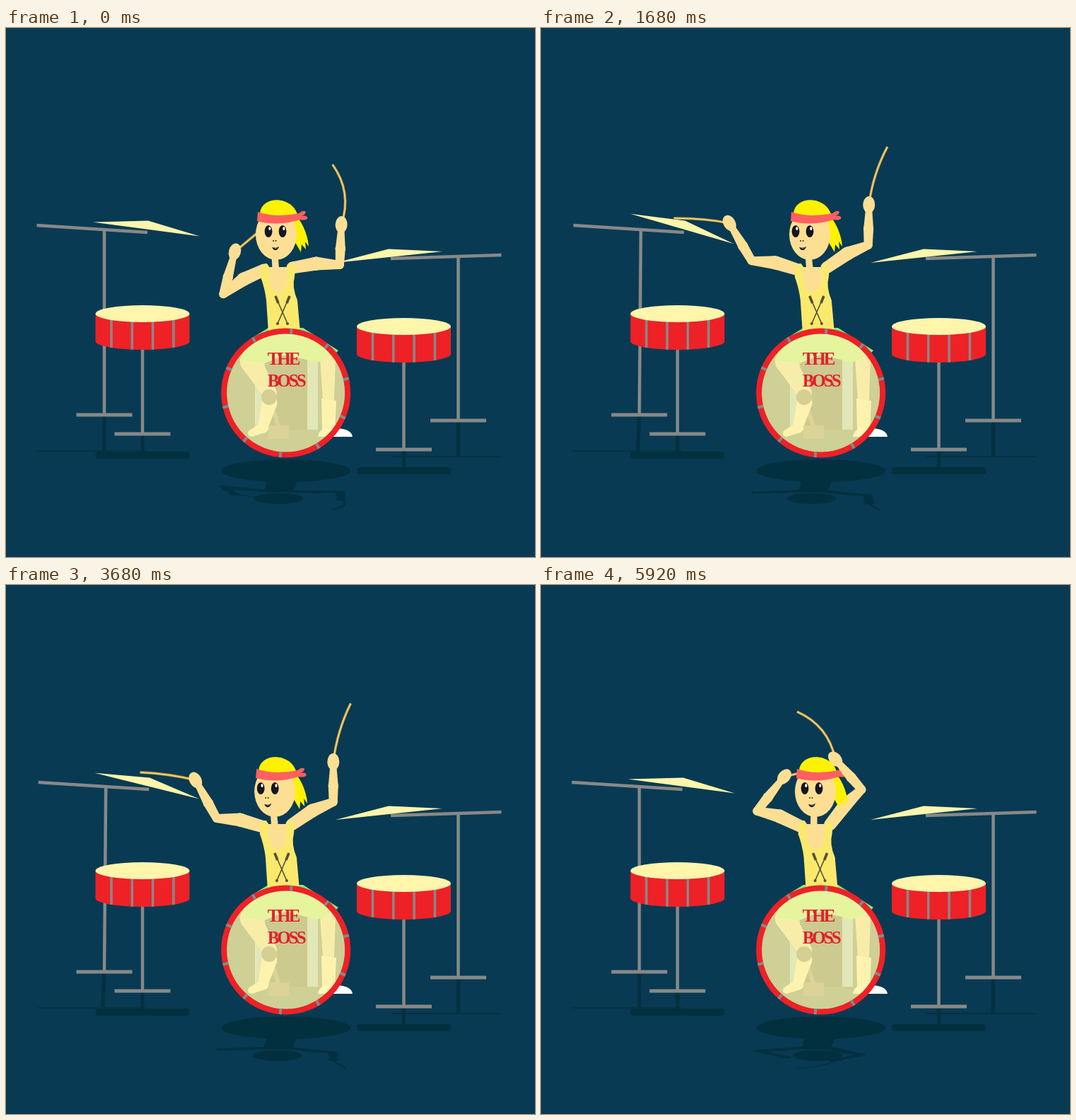
An HTML page with a canvas for the animation above (5.96 s loop, 748x748 px).

```html
<!DOCTYPE html>
<html lang="en">
<head>
<meta charset="utf-8">
<title>Drummer</title>
<style>
html, body { margin: 0; height: 100%; overflow: hidden; background: #083a53; }
canvas { display: block; width: 100vw; height: 100vh; }
</style>
</head>
<body>
<canvas id="stage" width="748" height="748"></canvas>
<script>
const c = document.getElementById('stage').getContext('2d');
const LOOP = 5960, BEAT = LOOP / 6, RAD = Math.PI / 180;
const BG = '#083a53', SHADE = '#03303f', GREY = '#888', RED = '#ee2127', CREAM = '#fff5ab',
      SKIN = '#fddf94', SHIRT = '#fbe96c', HAIR = '#fff200', BAND = '#ff6060', BLACK = '#15151c',
      LEG = '#dccfb4', BOOT = '#f4ecd8';

// Per hand: x, y, stick angle, stick bend. Then body lean and head turn.
const reach   = [344, 271,  -13, 0,  416, 246, -129, 22,  6, -.5],
      swing   = [324, 316,  -39, 0,  474, 278,  -99, 22,  0, -.1],
      strike  = [259, 345, -212, 3,  485, 287,   -2, -10, 12, 1],
      rebound = [263, 325, -211, 10, 475, 266,   -5, -14, 14, 1.2],
      raise   = [314, 258,  -62, 8,  444, 228,  -98, -6,  6, .1],
      crash   = [266, 276, -176, 4,  464, 250,  -72, -8, -2, -1];
const beat = [[0, swing], [160, strike], [194, strike], [212, rebound], [230, rebound],
  [440, raise], [640, crash], [675, crash], [BEAT - 40, reach]];
const keys = [-1, 0, 1].flatMap(n => beat.map(([t, p]) => [t + n * BEAT, p]));

const clamp = v => Math.min(1, Math.max(0, v));
// Swells up to a blow, holds briefly, then dies away
const blow = (t, at) => t < at ? clamp(1 - (at - t) / 100) : Math.exp(-Math.max(0, t - at - 34) / 45);

// Monotone cubic through the keys: smooth passes, no overshoot
function poseAt(t) {
  const i = keys.findIndex((k, j) => t >= k[0] && t < keys[j + 1][0]);
  const [[ta, a], [tb, b], [td, d], [te, e]] = keys.slice(i - 1, i + 3);
  const h = td - tb, u = (t - tb) / h;
  const slope = (p, q) => p * q > 0 ? 2 * p * q / (p + q) : 0;
  return b.map((v, j) => {
    const mid = (d[j] - v) / h;
    const m0 = slope((v - a[j]) / (tb - ta), mid), m1 = slope(mid, (e[j] - d[j]) / (te - td));
    return v + (d[j] - v) * u * u * (3 - 2 * u) + h * u * (1 - u) * (m0 * (1 - u) - m1 * u);
  });
}

// The elbow follows from the shoulder, the hand and two bone lengths
function armFrom(sx, sy, side, [hx, hy, angle, bend]) {
  const upper = 67, fore = side < 0 ? 62 : 57, length = side < 0 ? 79 : 86;
  const dist = Math.hypot(hx - sx, hy - sy);
  const open = Math.acos(clamp((upper ** 2 + dist ** 2 - fore ** 2) / (2 * upper * dist)));
  const a = Math.atan2(hy - sy, hx - sx) + side * open;
  return { sx, sy, hx, hy, bend, ex: sx + upper * Math.cos(a), ey: sy + upper * Math.sin(a),
    tx: hx + length * Math.cos(angle * RAD), ty: hy + length * Math.sin(angle * RAD) };
}

function at(x, y, angle, scale, draw) {
  c.save();
  c.translate(x, y);
  c.rotate(angle);
  c.scale(scale, scale);
  draw();
  c.restore();
}
function line(color, width, ...p) {
  c.strokeStyle = color;
  c.lineWidth = width;
  c.beginPath();
  for (let i = 0; i < p.length; i += 2) c.lineTo(p[i], p[i + 1]);
  c.stroke();
}
function poly(color, ...p) {
  c.fillStyle = color;
  c.beginPath();
  for (let i = 0; i < p.length; i += 2) c.lineTo(p[i], p[i + 1]);
  c.fill();
}
function box(color, x, y, w, h) {
  c.fillStyle = color;
  c.fillRect(x, y, w, h);
}
function oval(color, x, y, rx, ry = rx, angle = 0) {
  c.fillStyle = color;
  c.beginPath();
  c.ellipse(x, y, rx, ry, angle, 0, 7);
  c.fill();
}
function shape(color, d) {
  c.fillStyle = color;
  c.fill(new Path2D(d));
}
function limb(color, x1, y1, w1, x2, y2, w2) {
  const a = Math.atan2(y2 - y1, x2 - x1) + Math.PI / 2, s = Math.sin(a) / 2, k = Math.cos(a) / 2;
  poly(color, x1 + k * w1, y1 + s * w1, x2 + k * w2, y2 + s * w2,
    x2 - k * w2, y2 - s * w2, x1 - k * w1, y1 - s * w1);
  oval(color, x1, y1, w1 / 2);
  oval(color, x2, y2, w2 / 2);
}

function cymbalStand(x, barY, baseY, outerY, innerY, sway) {
  const top = x + sway;
  line(SHADE, 5, x, baseY, x - sway, baseY + 50);
  line(SHADE, 1.5, x - 95, baseY + 51, x + 60, baseY + 46 + 5);
  line(GREY, 4.5, x, baseY, top, barY);
  line(GREY, 5, x - 39.5, baseY, x + 39.5, baseY);
  line(GREY, 4.5, top - 95.5, barY + outerY, top + 61, barY + innerY);
}
function drum(x, y, baseY, hit) {
  const tilt = 3.7 * RAD * Math.min(1, hit * 2), k = 1 + .03 * hit, depth = baseY - y;
  const shift = x + Math.sin(tilt) * depth;
  line(SHADE, 5, x, baseY, shift, baseY + 28);
  c.fillStyle = SHADE;
  c.beginPath();
  c.roundRect(shift - 66.5 * k, baseY + 25, 133 * k, 10, 4);
  c.fill();
  at(x, baseY, tilt, 1, () => {
    line(GREY, 5, -39.5, 0, 39.5, 0);
    line(GREY, 4.5, 0, 0, 0, 45 - depth);
    c.scale(k, k);
    c.translate(0, -depth);
    c.fillStyle = RED;
    c.beginPath();
    c.ellipse(0, 39, 66.5, 12, 0, 0, Math.PI);
    c.lineTo(-66.5, 0);
    c.lineTo(66.5, 0);
    c.fill();
    for (let s = -44; s < 50; s += 29.3) {
      const dip = 12 * Math.sqrt(1 - (s / 66.5) ** 2);
      line(GREY, 3.5, s, dip, s, dip + 39);
    }
    oval(CREAM, 0, 0, 66.5, 12);
  });
}

function stick({ hx, hy, tx, ty, bend }, edge = '#b98f3c', core = '#f0cd70') {
  const dx = tx - hx, dy = ty - hy, len = Math.hypot(dx, dy);
  const path = new Path2D(`M${hx} ${hy}Q${(hx + tx) / 2 - dy / len * bend} ${
    (hy + ty) / 2 + dx / len * bend} ${tx} ${ty}`);
  for (const [w, ink] of [[3.6, edge], [2, core]]) {
    c.strokeStyle = ink;
    c.lineWidth = w;
    c.stroke(path);
  }
}
function upperArm({ sx, sy, ex, ey }, color = SKIN) {
  const mx = (sx + ex) / 2, my = (sy + ey) / 2 - 4;
  limb(color, sx, sy, 17, mx, my, 19);
  limb(color, mx, my, 19, ex, ey, 12);
}
function foreArm({ ex, ey, hx, hy }, color = SKIN) {
  const mx = ex + (hx - ex) * .4, my = ey + (hy - ey) * .4;
  limb(color, ex, ey, 12, mx, my, 14);
  limb(color, mx, my, 14, hx, hy, 8);
  oval(color, hx, hy, 12, 8.5, Math.atan2(hy - ey, hx - ex));
}

// The figure flattened onto the floor
function floorShadow(arms, headX, s, w, swell) {
  oval(SHADE, 396, 626, 91.5 * swell, 16);
  c.save();
  c.beginPath();
  c.rect(298, 600, 182, 100);
  c.clip();
  c.transform(1, 0, 0, -.18, 0, 716);
  poly(SHADE, s - 20, 330, s + 20, 330, w + 22, 450, w - 22, 450);
  oval(SHADE, headX + 3, 282, 35, 43);
  for (const arm of arms) {
    upperArm(arm, SHADE);
    foreArm(arm, SHADE);
    stick(arm, SHADE, SHADE);
  }
  c.restore();
}

function torso(s, w) {
  poly(SKIN, s - 17, 338, s + 17, 338, s + 18, 385, s - 14, 385);
  shape(SHIRT, `M${s - 25} 352Q${s - 24} 333 ${s - 17} 333Q${s - 13} 333 ${s - 13} 350
    C${s - 14} 382 ${s + 13} 382 ${s + 13} 350Q${s + 13} 331 ${s + 18} 332Q${s + 25} 335 ${s + 23} 352
    Q${s + 19} 366 ${w + 19} 385L${w + 23} 430L${w - 22} 430L${w - 25} 385Q${s - 19} 368 ${s - 25} 352Z`);
  for (const d of [-1, 1]) {
    const x = w - 2 + d;
    line('#554d3d', 1.6, x + d * 9, 379, x - d * 8, 418);
    line('#554d3d', 3.6, x + d * 9, 379, x + d * 5, 389);
    oval('#554d3d', x - d * 8, 418, 2);
  }
}

function headOf(x, turn, open, s) {
  const y = 293 - 5 * clamp(turn), flip = turn > 0 ? -1 : 1, ex = turn * 10;
  limb(SKIN, x - 2, y + 28, 9, s - 3, 350, 10);
  at(x, y, 0, 1, () => {
    c.scale(flip, 1);
    shape(HAIR, 'M20 -36Q39 -20 45 8L46 16L41 9L42 20L36 13L35 24L28 12L20 0Z');
    c.scale(flip, 1);
    oval(SKIN, 0, -1, 29, 36);
    for (const px of [ex - 10, ex + 10]) {
      oval(BLACK, px, -5.5, 5.4, 8.6);
      oval('#fff', px + 1.8, -9.5, 1.6, 2.6);
      box(SKIN, px - 6.5, -15, 13, 10 * (1 - open));
    }
    for (const px of [ex - 3, ex + .5]) oval(BLACK, px, 8, .9);
    shape(BLACK, `M${ex - 5} 17Q${ex + 1} 19 ${ex + 5} 16Q${ex + 3} 22 ${ex - 1} 21Q${ex - 4} 20 ${ex - 5} 17Z`);
    shape('#fff', `M${ex - 3} 17.6Q${ex + 1} 19 ${ex + 4} 17Q${ex + 1} 20 ${ex - 3} 17.6Z`);
    c.scale(flip, 1);
    const crown = (271 - y) / .75 - 28;
    shape(HAIR, `M-23 -28C-24 ${crown} 26 ${crown} 31 -25Q4 -18 -23 -28Z`);
    shape(BAND, 'M-26 -33Q0 -24 32 -31L34 -22Q2 -12 -27 -20Z');
    shape(BAND, 'M30 -29Q38 -37 42 -33Q41 -28 35 -27Q46 -29 44 -23Q38 -20 31 -23Z');
  });
}

function legs(kick) {
  const knee = 373 - 4 * kick, ankle = 364 + 11 * kick, beater = 372 + 25 * kick;
  box('#001f30', 352, 464, 86, 104);
  box('#6ab0ff', 352, 466, 14, 102);
  box('#6ab0ff', 426, 464, 15, 104);
  line('#4f4a60', 6, 386, 566, beater, 522);
  limb(LEG, 346, 472, 30, knee, 516, 20);
  limb(LEG, knee, 516, 20, ankle, 562, 14);
  limb(BOOT, knee, 530, 21, ankle, 562, 15);
  limb(BOOT, ankle, 565, 15, ankle - 17, 573, 10);
  limb(LEG, 455, 468, 22, 456, 525, 16);
  poly(BOOT, 446, 524, 467, 527, 465, 570, 447, 570);
  shape('#fff', 'M441 578Q443 566 455 566Q488 564 490 578Z');
  poly('#7ff07d', 371, 424, 420, 424, 470, 456, 464, 462, 440, 473, 395, 462, 366, 474, 330, 470, 345, 440);
  box('#4f4a60', 371, 562, 29, 19);
  oval('#33304a', beater, 522, 11);
}

function bassDrum(swell) {
  at(395.7, 516, 0, swell, () => {
    oval('rgba(255,245,165,.8)', 0, 0, 84);
    c.strokeStyle = RED;
    c.lineWidth = 8;
    c.beginPath();
    c.arc(0, 0, 87.5, 0, 7);
    c.stroke();
    for (let a = 95; a < 455; a += 36) {
      const x = Math.cos(a * RAD), y = Math.sin(a * RAD);
      line(GREY, 4, x * 83.5, y * 83.5, x * 91.5, y * 91.5);
    }
    c.fillStyle = '#e31f2b';
    c.font = 'bold 25px "Liberation Serif", "Noto Serif", serif';
    c.letterSpacing = '-3px';
    c.fillText('THE', -26, -40);
    c.fillText('BOSS', -26, -9);
  });
}

function draw(now) {
  const t = now % BEAT, p = poseAt(t), [lean, turn] = p.slice(8);
  const hit = blow(t, 160), smash = blow(t, 640), swell = 1 + .035 * hit;
  const blink = clamp((Math.abs(t - 250) - 40) / 15);
  const headX = 382 + lean, s = 385 + .6 * lean, w = 393 + .6 * lean;
  const left = armFrom(s - 20, 342, -1, p), right = armFrom(s + 20, 339, 1, p.slice(4));

  box(BG, 0, 0, 748, 748);
  floorShadow([left, right], headX, s, w, swell);
  cymbalStand(139, 286, 547, -7, 3, 2.2 * clamp(smash * 2));
  cymbalStand(639.5, 323, 555, 3, -2, -2.2 * clamp(hit * 2));
  at(201 + 3 * smash, 276.5, 11.7 * RAD * smash, 1, () => poly(CREAM, -78, -2, 0, -4, 73, 18));
  at(541 - 3 * hit, 316, -11.7 * RAD * hit, 1, () => poly(CREAM, -75, 16, 0, -3.5, 76, 0));
  drum(193, 404, 574, hit);
  drum(562.5, 422, 596, 0);
  stick(left);
  upperArm(left);
  upperArm(right);
  foreArm(left);
  legs(hit ** 3);
  torso(s, w);
  headOf(headX, turn, blink, s);
  stick(right);
  foreArm(right);
  bassDrum(swell);
}

const start = performance.now();
function frame() {
  draw(performance.now() - start);
  requestAnimationFrame(frame);
}
frame();
</script>
</body>
</html>
```
